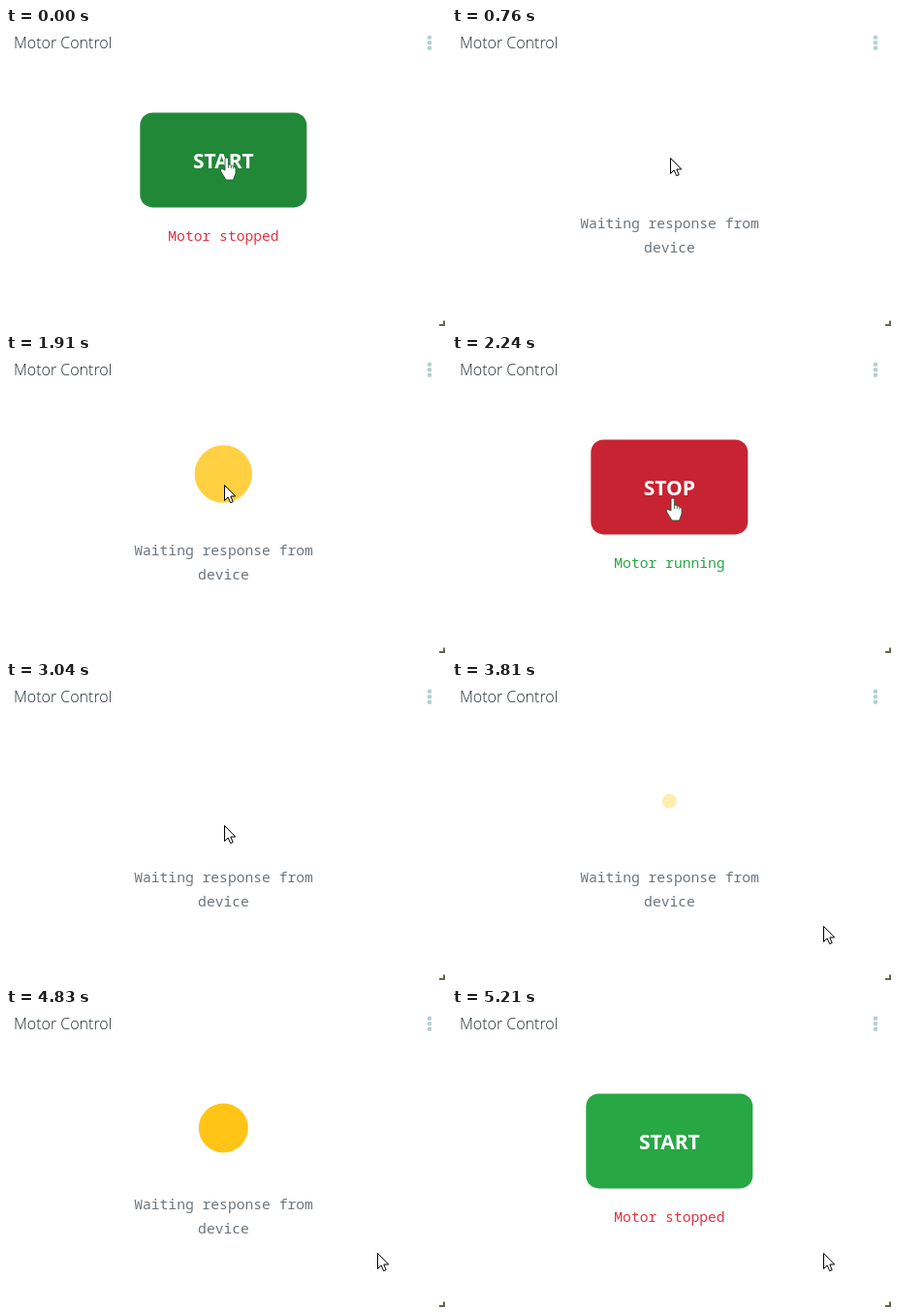
Write an HTML page that moves like this. It is 454 px wide and 309 px high and loops after 5390 ms.

```html
<!DOCTYPE html>
<html lang="en">
<head>
<meta charset="utf-8">
<title>Motor Control</title>
<style>
  html, body { margin: 0; width: 100%; height: 100%; overflow: hidden; background: #fff; }
  svg { display: block; width: 454px; height: 309px; }
  .title { font: 300 16px "Open Sans", sans-serif; fill: #222e30; }
  .label { font: 700 21px "Open Sans", sans-serif; fill: #fff; text-anchor: middle; }
  .status { font: 14.67px "Noto Sans Mono", monospace; text-anchor: middle; }
  .waiting { fill: #6c757d; }
</style>
</head>
<body>
<svg viewBox="0 0 454 309">
  <text class="title" x="8" y="20.5">Motor Control</text>
  <g fill="#b4d0d0">
    <circle cx="437" cy="9.7" r="2.3"/>
    <circle cx="437" cy="15.2" r="2.3"/>
    <circle cx="437" cy="20.7" r="2.3"/>
  </g>
  <path d="M447 307H452V302.5" fill="none" stroke="#66664f" stroke-width="2"/>

  <g id="control">
    <rect id="ring"/>
    <rect id="button" y="87.4" height="98" rx="13"/>
    <text id="label" class="label" x="224.3" y="145"></text>
    <text id="status" class="status" x="224.5" y="220"></text>
  </g>

  <g id="wait">
    <circle id="dot" cx="224.3" cy="123" fill="#ffc107"/>
    <text class="status waiting" x="224.5" y="207">Waiting response from</text>
    <text class="status waiting" x="224.5" y="232">device</text>
  </g>

  <path id="arrow" d="M.5.5V16.5L4.2 13L6.7 18.7L9.2 17.6L6.8 12H11.7Z" fill="#fff" stroke="#000"/>
  <g id="hand" fill="#fff" stroke="#174d24" stroke-width=".8">
    <path d="M1 13V1.5Q1 0 2.7 0T4.4 1.5V7.3Q7 6.6 7.3 8.2Q9.4 7.6 9.8 9.2Q12 9 12 11V16L9.5 23H2L-3.5 14Q-4.5 11.5-2 11.5Z"/>
    <path d="M4.4 7.3V11M7.3 8.2V11M9.8 9.2V11.5" fill="none"/>
  </g>
</svg>
<script>
const LOOP = 5390, CENTER = 224.3, DOT_RADIUS = 48;
const $ = id => document.getElementById(id);
const set = (id, attrs) => Object.entries(attrs).forEach(([k, v]) => $(id).setAttribute(k, v));
const show = (id, on) => set(id, { display: on ? 'inline' : 'none' });
const clamp = x => Math.min(1, Math.max(0, x));
const lerp = (a, b, p) => a + (b - a) * p;

// Colours are RGB triples: rest, hover, pressed.
const START = {
  label: 'START', width: 172, status: 'Motor stopped', statusColor: '#dc3545',
  rest: [40, 167, 69], hover: [33, 136, 56], pressed: [30, 126, 52], ring: 'rgb(72,180,97)'
};
const STOP = {
  label: 'STOP', width: 162, status: 'Motor running', statusColor: '#28a745',
  rest: [220, 53, 69], hover: [200, 35, 51], pressed: [189, 33, 48], ring: 'rgb(225,83,97)'
};

// The picture advances in steps of about 47 ms between these moments.
const KEYS = [0, 290, 420, 700, 1220, 1270, 1780, 1830, 1910, 2240, 2660, 2810, 2990, 3040,
  3500, 3550, 3810, 4060, 4090, 4600, 4650, 4830, 5160, 5210, LOOP];
function stepTime(t) {
  const i = KEYS.findIndex(k => k > t) - 1;
  const from = KEYS[i], span = KEYS[i + 1] - from;
  const step = span / Math.max(1, Math.round(span / 47));
  return from + Math.floor((t - from) / step) * step;
}

function drawButton(state, hovered, press) {
  const x = CENTER - state.width / 2, grow = 3.2 * press;
  const color = hovered ? state.hover.map((c, i) => lerp(c, state.pressed[i], press)) : state.rest;
  set('button', { x, width: state.width, fill: `rgb(${color.map(Math.round)})` });
  set('ring', {
    x: x - grow, y: 87.4 - grow, width: state.width + 2 * grow, height: 98 + 2 * grow,
    rx: 13 + grow, fill: state.ring, 'fill-opacity': press / 2
  });
  $('label').textContent = state.label;
  $('status').textContent = state.status;
  set('status', { fill: state.statusColor });
}

// The dot grows steadily while fading in for half a cycle, then out.
function drawDot(elapsed, period) {
  const p = elapsed / period % 1;
  set('dot', { r: elapsed > 0 && p > .08 ? DOT_RADIUS * p : 0, opacity: 1 - Math.abs(2 * p - 1) });
}

function cursorAt(t) {
  const away = clamp((t - 3550) / 250), ease = away * away * (3 - 2 * away);
  const y = lerp(134, 148, clamp((t - 2050) / 150));
  return [lerp(225, 383, ease), lerp(y, 252, ease)];
}

function draw(time) {
  const t = stepTime(time);
  const waiting = t >= 700 && t < 2240 || t >= 2990 && t < 5210;
  const hovered = !waiting && t < 5210;
  show('control', !waiting);
  show('wait', waiting);
  show('hand', hovered);
  show('arrow', !hovered);

  if (!waiting) {
    const pressStart = t < 700 ? 250 : 2625;
    drawButton(t >= 2240 && t < 5210 ? STOP : START, hovered, hovered ? clamp((t - pressStart) / 150) : 0);
  } else if (t < 2240) {
    drawDot(t - 704, 745);
  } else {
    const e = t - 2990;
    drawDot(e + Math.min(38, e * .1), 742);
  }

  const transform = `translate(${cursorAt(t)})`;
  set('arrow', { transform });
  set('hand', { transform });
}

const begin = performance.now();
function frame() {
  draw((performance.now() - begin) % LOOP);
  requestAnimationFrame(frame);
}
frame();
</script>
</body>
</html>
```
